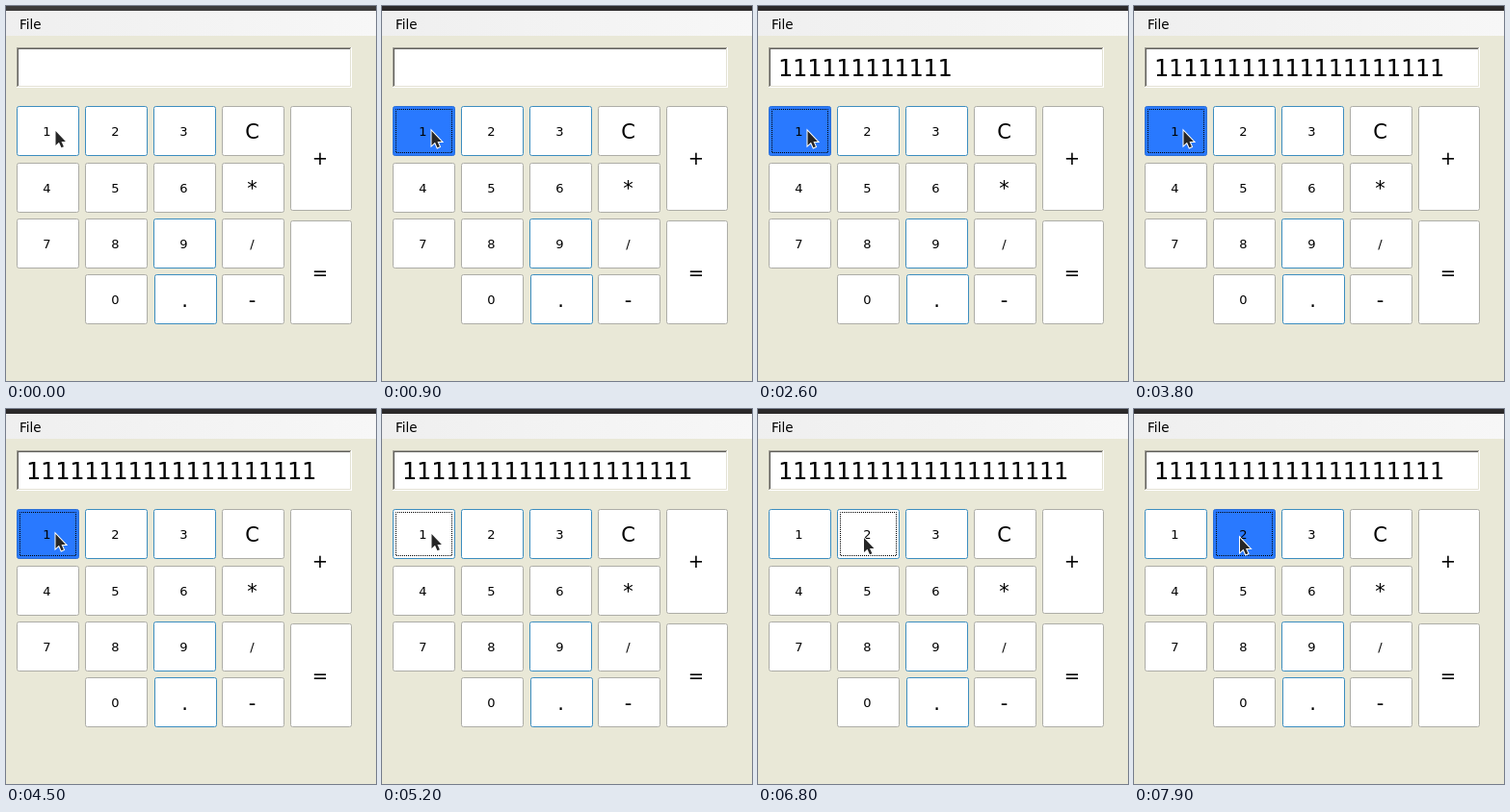
An HTML page that plays this animation: 384x390 px, repeating every 8 s.

```html
<!DOCTYPE html>
<html lang="en">
<head>
<meta charset="utf-8">
<title>Calculator</title>
<style>
  html, body { margin: 0; width: 100%; height: 100%; overflow: hidden; background: #e9e8d7; }
  svg { display: block; }
  text { font-family: "DejaVu Sans", sans-serif; font-size: 13px; fill: #000; white-space: pre; }
  .key text { text-anchor: middle; }
  .key .big { font-size: 21px; }
  .key .tall { font-size: 19.5px; }
  .face { fill: #fff; stroke: #adada7; }
  .blue .face { stroke: #3c8dbf; }
  .down .face { fill: #2979ff; stroke: #2b6fd6; }
  .focus { fill: none; stroke: #000; stroke-dasharray: 1 1; stroke-dashoffset: .5; visibility: hidden; }
  .focused .focus { visibility: visible; }
  #display { font-family: "DejaVu Sans Mono", monospace; font-size: 25px; }
  #cursor { fill: #262626; stroke: #fff; stroke-width: 2; paint-order: stroke; }
</style>
</head>
<body>
<svg width="384" height="390" viewBox="0 0 384 390">
  <defs>
    <linearGradient id="menu">
      <stop offset="0" stop-color="#efefef"/>
      <stop offset="1" stop-color="#f7f7f7"/>
    </linearGradient>
  </defs>
  <rect width="384" height="390" fill="#e9e8d7"/>
  <rect id="bar" width="384" height="5"/>
  <rect y="5" width="384" height="26" fill="url(#menu)"/>
  <text x="14" y="24" style="font-size:13.5px">File</text>

  <rect x="11" y="43" width="348" height="42" fill="#fff"/>
  <g fill="none">
    <path d="M11 43.5H358M11.5 43V84" stroke="#9d9b92"/>
    <path d="M12 44.5H357M12.5 44V83" stroke="#62615d"/>
    <path d="M12 83.5H357.5V44" stroke="#e3e1d4"/>
  </g>
  <text id="display" x="20.8" y="72.5"></text>

  <g id="keys"></g>
  <path id="cursor" d="M0 0V15L3.5 11.8L6 17.3L8.4 16.2L6 11H10.4Z"/>
</svg>
<script>
const LOOP = 8000;
const FRAME = 100;
const REPEAT = 150;
const NS = "http://www.w3.org/2000/svg";
const $ = id => document.getElementById(id);

function add(parent, tag, attrs) {
  const el = document.createElementNS(NS, tag);
  for (const name in attrs) el.setAttribute(name, attrs[name]);
  return parent.appendChild(el);
}

const keys = {};
function addKey(label, x, y, w, h, size, base) {
  const g = add($("keys"), "g", { class: "1239.".includes(label) ? "key blue" : "key" });
  add(g, "rect", { class: "face", x: x + .5, y: y + .5, width: w, height: h, rx: 2 });
  add(g, "rect", { class: "focus", x: x + 3.5, y: y + 3.5, width: w - 6, height: h - 6 });
  add(g, "text", { class: size, x: x + w / 2 - .5, y: y + base }).textContent = label;
  keys[label] = g;
}

["123C", "456*", "789/", " 0.-"].forEach((row, r) => {
  [...row].forEach((label, c) => {
    if (label === " ") return;
    const big = "C*.-".includes(label);
    const x = 11 + 71 * c + (label === "." ? 1 : 0);
    addKey(label, x, Math.round(104.4 + 58.3 * r), 64, 51, big ? "big" : "", big ? 33.5 : 31);
  });
});
addKey("+", 295, 104, 63, 108, "tall", 61);
addKey("=", 295, 223, 63, 107, "tall", 60.5);

// Key, time pressed, time released
const presses = [
  ["1", 900, 4200], ["1", 4500, 4600], ["1", 4800, 5200], ["1", 5500, 5600],
  ["2", 6400, 6800], ["2", 7600, 7800], ["2", 7900, LOOP]
];

// A held key repeats until the display overflows and is cut to 20 digits
function digits(t) {
  if (t < 1000) return 0;
  return t < 4100 ? Math.min(21, Math.floor((t - 750) / REPEAT)) : 20;
}

const clamp = p => Math.max(0, Math.min(1, p));

function render(time) {
  const t = Math.floor(time / FRAME) * FRAME;
  const focus = presses.filter(p => p[1] <= t).pop()?.[0];
  for (const label of ["1", "2"]) {
    const down = presses.some(([key, from, to]) => key === label && from <= t && t < to);
    keys[label].classList.toggle("down", down);
    keys[label].classList.toggle("focused", focus === label);
  }
  $("bar").setAttribute("fill", focus ? "#2b292a" : "#3c3b3b");
  $("display").textContent = "1".repeat(digits(t));

  const p = clamp((t - 5800) / 300);
  $("cursor").setAttribute("transform", `translate(${51.5 + 58.5 * p} ${130 + 4 * p})`);
}

const start = performance.now();
function tick() {
  render((performance.now() - start) % LOOP);
  requestAnimationFrame(tick);
}
tick();
</script>
</body>
</html>
```
